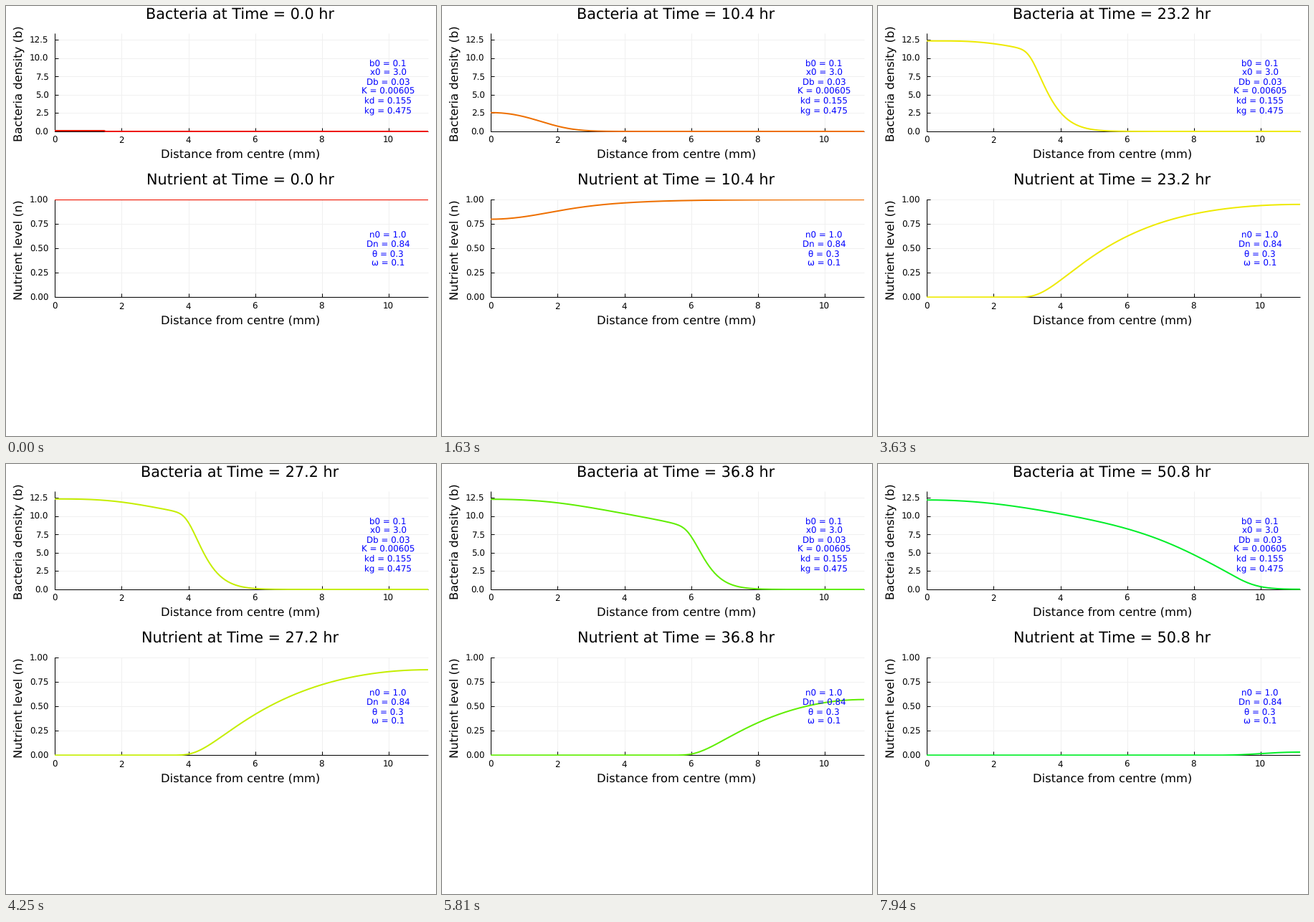
Write a matplotlib script that moves like this. It is 600 by 600 pixels and loops after 8 s.

```python
import colorsys

import matplotlib.pyplot as plt
import numpy as np
from matplotlib.animation import FuncAnimation
from matplotlib.patches import PathPatch, Rectangle
from matplotlib.path import Path

plt.rcParams["font.family"] = "DejaVu Sans"
plt.rcParams["text.hinting"] = "none"

SIZE, DPI = 600, 100
PT = 72 / DPI

# 128 states shown for 62.5 ms each, checked on a 20 ms clock
STATES, HOLD, HOURS = 128, 62.5, 0.4
TICK = 20
FRAMES = 400

# Model constants
B0, X0, DB, K, KD, KG = 0.1, 3.0, 0.03, 0.00605, 0.155, 0.475
N0, DN, THETA, OMEGA = 1.0, 0.84, 0.3, 0.1
LENGTH, CELLS, SUBSTEPS = 11.17, 280, 500

LEFT, RIGHT = 68.3, 588.5
BLUE = "#0000ff"


def simulate():
    """Bacteria and nutrient profiles for every state, no-flux ends."""
    x = np.linspace(0, LENGTH, CELLS + 1)
    dt = HOURS / SUBSTEPS
    spread = np.array([[DB], [DN]]) * dt / x[1] ** 2
    rate = np.array([[KG - KD], [-OMEGA * (KG - THETA * KD)]]) * dt
    pad = np.empty((2, CELLS + 3))
    u = pad[:, 1:-1]
    u[0] = np.where(x <= X0 / 2, B0, 0)
    u[1] = N0
    states = [u.copy()]
    for _ in range(STATES - 1):
        for _ in range(SUBSTEPS):
            pad[:, 0] = pad[:, 2]
            pad[:, -1] = pad[:, -3]
            uptake = u[0] * u[1] / (u[1] + K)
            u += spread * (pad[:, 2:] + pad[:, :-2] - 2 * u) + rate * uptake
        states.append(u.copy())
    return x, states


def line_color(k):
    hue = np.interp(k, [0, 26, 41, 58, 79, 108, 127],
                    [5, 28, 43, 59, 83, 112, 130])
    return colorsys.hsv_to_rgb(hue / 360, 1, 0.935)


fig = plt.figure(figsize=(SIZE / DPI, SIZE / DPI), dpi=DPI, facecolor="white")
ax = fig.add_axes([0, 0, 1, 1])
ax.set_xlim(0, SIZE)
ax.set_ylim(SIZE, 0)
ax.axis("off")


def text(x, y, s, px, color="black", ha="center", **kw):
    return ax.text(x, y, s, fontsize=px * PT, color=color, ha=ha,
                   va="baseline", **kw)


def rules(segments, color, z):
    """Draw separate straight segments (x0, y0, x1, y1) as one path."""
    points = np.reshape(segments, (-1, 2))
    codes = [Path.MOVETO, Path.LINETO] * len(segments)
    ax.add_patch(PathPatch(Path(points, codes), fill=False, edgecolor=color,
                           lw=PT, capstyle="butt", zorder=z))


class Panel:
    def __init__(self, name, ylabel, top, bottom, ymax, ticks, fmt,
                 label_y, notes, notes_y, base):
        self.name, self.bottom = name, bottom
        self.scale = (bottom - top) / ymax
        grid = []
        frame = [(LEFT, top, LEFT, bottom), (LEFT, bottom, RIGHT, bottom)]
        for v in range(0, 12, 2):
            px = self.px(v)
            grid.append((px, top, px, bottom))
            frame.append((px, bottom, px, bottom - 5))
            text(px - 0.7, base + 16, str(v), 11.9)
        for v in ticks:
            py = self.py(v)
            grid.append((LEFT, py, RIGHT, py))
            frame.append((LEFT, py, LEFT + 5, py))
            text(59.6, py + 4.4, fmt % v, 11.9, ha="right")
        rules(grid, "#f0f0f0", 1)
        rules(frame, "black", 2)
        text(327.2, base + 36.4, "Distance from centre (mm)", 16.35)
        text(22.7, label_y, ylabel, 16.35, rotation=90,
             rotation_mode="anchor")
        for i, note in enumerate(notes):
            text(533.2, notes_y + 12.95 * i, note, 11.9, BLUE, zorder=5)
        self.title = text(326.5, base - 156.9, "", 20.8)
        self.curve, = ax.plot([], [], lw=2 * PT, zorder=3, snap=False)
        y0, y1 = round(top), round(bottom) + 1
        self.curve.set_clip_path(Rectangle((68, y0), 521, y1 - y0,
                                           transform=ax.transData))

    def px(self, x):
        return LEFT + x * (RIGHT - LEFT) / LENGTH

    def py(self, v):
        return self.bottom - v * self.scale

    def show(self, x, values, k):
        self.title.set_text(f"{self.name} at Time = {k * HOURS:.1f} hr")
        self.curve.set_data(self.px(x), self.py(values))
        self.curve.set_color(line_color(k))


panels = [
    Panel("Bacteria", "Bacteria density (b)", 38.2, 175.0, 13.4,
          np.arange(0, 13, 2.5), "%.1f", 108.2,
          [f"b0 = {B0}", f"x0 = {X0}", f"Db = {DB}", f"K = {K}",
           f"kd = {KD}", f"kg = {KG}"], 84.3, 175.2),
    Panel("Nutrient", "Nutrient level (n)", 270.1, 406.4, 1.0,
          np.arange(0, 1.1, 0.25), "%.2f", 340,
          [f"n0 = {N0}", f"Dn = {DN}", f"θ = {THETA}", f"ω = {OMEGA}"],
          324.3, 407.0),
]

grid_x, states = simulate()


def update(i):
    k = min(int((i * TICK + TICK / 2) / HOLD), STATES - 1)
    for panel, values in zip(panels, states[k]):
        panel.show(grid_x, values, k)
    return []


anim = FuncAnimation(fig, update, frames=FRAMES, interval=TICK, repeat=True,
                     repeat_delay=0, blit=False)
plt.show()
```
